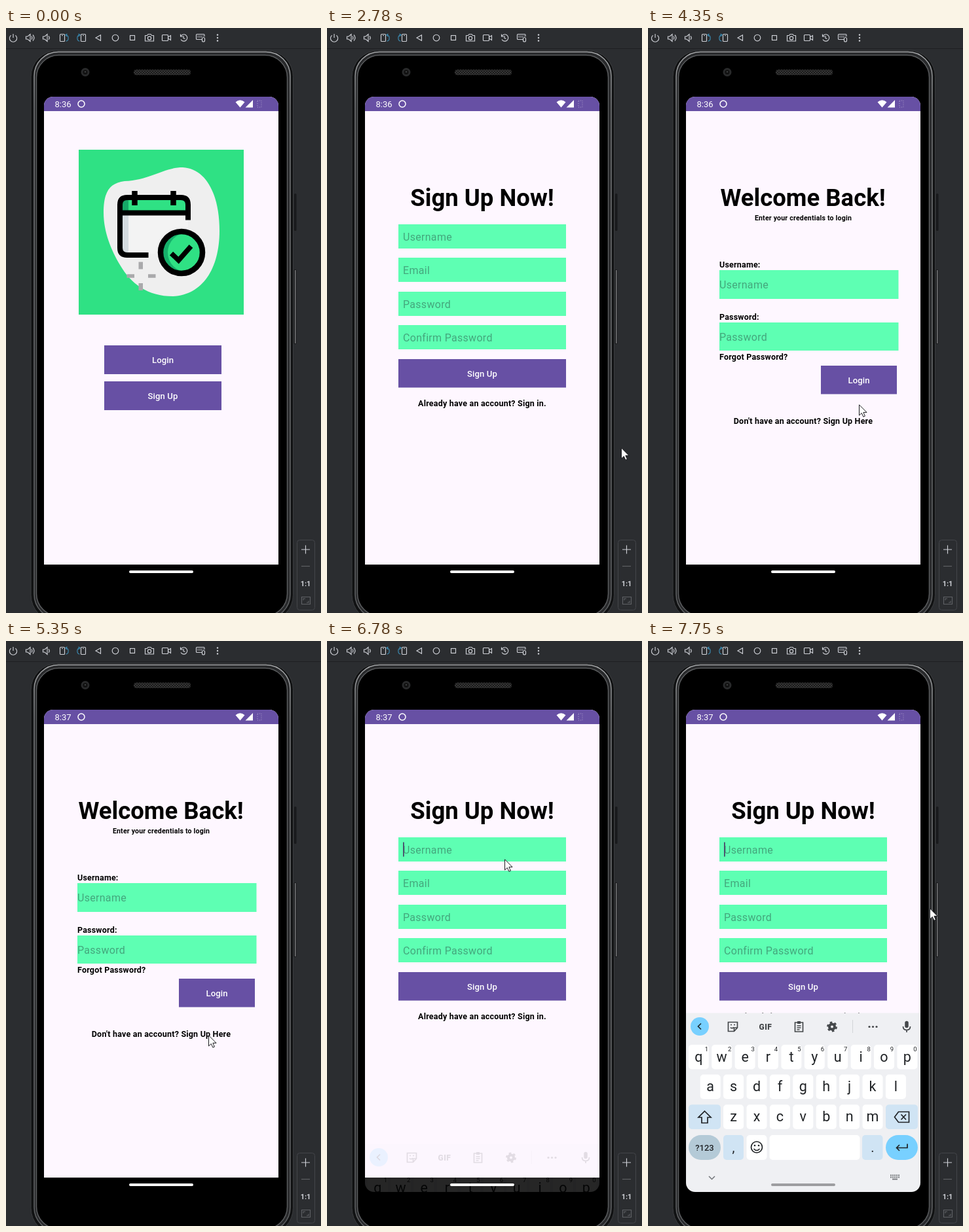
An HTML page for the animation above (8000 ms loop, 481 px wide and 894 px high).

```html
<!DOCTYPE html>
<html lang="en">
<head>
<meta charset="utf-8">
<title>Task app walkthrough</title>
<style>
html, body { margin: 0; width: 100%; height: 100%; overflow: hidden; background: #2b2d30; }
svg { display: block; width: 100vw; height: 100vh; font-family: Roboto, sans-serif; }
.loop { animation: 8s linear infinite; }
.mid { text-anchor: middle; }
.line { fill: none; stroke: #ced0d6; stroke-width: 1.15; }
.dim { stroke: #5f6165; }
.icon { fill: none; stroke: #45484b; stroke-width: 1.7; }
.button { fill: #6750a4; }
.label { fill: #fff; font-size: 13.1px; font-weight: 500; letter-spacing: .1px; text-anchor: middle; }
.title { font-size: 36.5px; font-weight: 700; text-anchor: middle; }
.bold { font-size: 12.5px; font-weight: 700; letter-spacing: .2px; }
.small { font-size: 10.55px; }
.field { fill: #5effb3; }
.hint { fill: #44a67c; font-size: 16px; letter-spacing: .3px; }

#home { animation-name: home; animation-timing-function: step-end; }
#signup { animation-name: signup; animation-timing-function: step-end; }
#login { animation-name: login; animation-timing-function: step-end; }
#before { animation-name: before; animation-timing-function: step-end; }
#after { animation-name: after; animation-timing-function: step-end; }
#caret { animation-name: caret; animation-timing-function: step-end; }
#handle { animation-name: handle; animation-timing-function: step-end; }
#keyboard { animation-name: rise; }
#pointer { animation-name: move; }
#arrow { animation-name: arrow; animation-timing-function: step-end; }

@keyframes home { 0% { visibility: visible } 19.75%, 100% { visibility: hidden } }
@keyframes signup {
  0%, 52.75% { visibility: hidden }
  19.75%, 71.125%, 100% { visibility: visible }
}
@keyframes login { 0%, 71.125%, 100% { visibility: hidden } 52.75% { visibility: visible } }
@keyframes before { 0% { visibility: visible } 56.25%, 100% { visibility: hidden } }
@keyframes after { 0% { visibility: hidden } 56.25%, 100% { visibility: visible } }
@keyframes caret {
  0%, 90.875% { visibility: hidden }
  83.125%, 96.875%, 100% { visibility: visible }
}
@keyframes handle { 0% { fill: #fff } 93.375% { fill: #c8c8ca } 96.875%, 100% { fill: #9d9da0 } }
@keyframes rise {
  0%, 84.74% { transform: translateY(274px); opacity: 0 }
  84.75% { transform: translateY(200px); opacity: .15 }
  85.6% { transform: translateY(200px); opacity: .15; animation-timing-function: cubic-bezier(.1, .6, .4, 1) }
  88.25%, 100% { transform: none; opacity: 1 }
}
@keyframes arrow {
  0%, 24.5% { visibility: hidden }
  2.5%, 34.75%, 100% { visibility: visible }
}
@keyframes move {
  0%, 2.5% { transform: translate(444px, 838px); animation-timing-function: cubic-bezier(.3, .2, .5, 1) }
  12.125% { transform: translate(297px, 549px) }
  13%, 19.75% { transform: translate(285px, 547px); animation-timing-function: ease-in }
  24% { transform: translate(481px, 672px) }
  34.74% { transform: translate(500px, 672px) }
  34.75%, 35.6% { transform: translate(449px, 641px); animation-timing-function: ease-in-out }
  40.5% { transform: translate(286px, 546px); animation-timing-function: ease-in-out }
  44.375%, 51.875% { transform: translate(327px, 571px) }
  52.75%, 55.1% { transform: translate(322px, 575px); animation-timing-function: ease-in-out }
  58.625%, 63.625% { transform: translate(309px, 602px) }
  65% { transform: translate(309px, 606px) }
  66.875%, 74.5% { transform: translate(309px, 602px); animation-timing-function: ease-in-out }
  80.625%, 85.6% { transform: translate(271px, 333px) }
  86.6% { transform: translate(280px, 372px) }
  87.8% { transform: translate(345px, 420px) }
  89.125%, 100% { transform: translate(430px, 408px) }
}
</style>
</head>
<body>
<svg viewBox="0 0 481 894" preserveAspectRatio="none">
  <defs>
    <clipPath id="screen"><rect x="58" y="105" width="358" height="737" rx="14"/></clipPath>
    <clipPath id="badge"><circle cx="268" cy="343" r="30"/></clipPath>
    <linearGradient id="rim" x1="0" x2="0" y1="0" y2="1">
      <stop offset="0" stop-color="#a3a5a7"/><stop offset=".1" stop-color="#77797b"/><stop offset="1" stop-color="#5d5f61"/>
    </linearGradient>
    <pattern id="mesh" width="4" height="4" patternUnits="userSpaceOnUse">
      <rect width="4" height="4" fill="#1b1b1b"/><path d="M0 0L4 4M4 0L0 4" stroke="#3c3c3c" stroke-width=".8"/>
    </pattern>
  </defs>

  <rect width="481" height="894" fill="#2b2d30"/>
  <rect y="31" width="481" height="1" fill="#1e1f22"/>

  <g class="line">
    <path d="M11 9V15M7.6 11.2A5.6 5.6 0 1 0 14.4 11.2"/>
    <path d="M30.500 13H33L37 9.500V20.500L33 17H30.500ZM39 12.500Q41 15 39 17.500M41 10.500Q45 15 41 19.500"/>
    <path d="M56.500 13H59L63 9.500V20.500L59 17H56.500ZM65 12.300Q67.500 15 65 17.700"/>
    <rect x="82.500" y="9.500" width="7" height="11" rx="1"/><path d="M85 11.500H87"/>
    <path d="M91 10.500Q96 11 95 17M93.500 9L91 10.500L93 13M91.500 20Q94.500 20 95 17" stroke="#3b8fb8"/>
    <rect x="114.500" y="9.500" width="7" height="11" rx="1"/><path d="M117 11.500H119"/>
    <path d="M113 10.500Q108 11 109 17M110.500 9L113 10.500L111 13M112.500 20Q109.500 20 109 17" stroke="#3b8fb8"/>
    <path d="M144.500 10.700V19.300L137 15Z"/>
    <circle cx="167" cy="15" r="4.800"/>
    <rect x="189.500" y="11.500" width="7" height="7"/>
    <path d="M212.500 11.500H215.500L217 9.500H221L222.500 11.500H225.500V20H212.500Z"/><circle cx="219" cy="15.500" r="2.600"/>
    <rect x="238.500" y="10.500" width="9" height="9" rx="1"/><path d="M247.500 14L251.500 11.500V18.500L247.500 16"/>
    <path d="M266.500 9.500V13H270M266.700 13A5.200 5.200 0 1 1 267 17.500M271 12V15.500L273.500 16.500"/>
    <path d="M299 17.500H291.500Q290.500 17.500 290.500 16.500V10.500Q290.500 9.500 291.500 9.500H302Q303 9.500 303 10.500V13"/>
    <path d="M292.500 12H301.500M292.500 14H299" stroke-dasharray="1.500 1"/><rect x="299.500" y="14.500" width="4" height="6.500" rx="2"/>
  </g>
  <g fill="#ced0d6"><circle cx="323" cy="10.500" r="1.200"/><circle cx="323" cy="15" r="1.200"/><circle cx="323" cy="19.500" r="1.200"/></g>

  <!-- phone body -->
  <rect x="440" y="253" width="3.500" height="57" rx="1.500" fill="#191a1c"/>
  <rect x="439.500" y="369" width="4" height="114" rx="1.500" fill="#1a1b1d"/>
  <rect x="441" y="370" width="1.500" height="112" fill="#77797b"/>
  <rect x="38" y="34.500" width="400.500" height="872" rx="40" fill="#111213" stroke="#3a3c3e"/>
  <rect x="43" y="36.500" width="391" height="866" rx="37" fill="#28292b" stroke="url(#rim)" stroke-width="1.500"/>
  <rect x="46.500" y="41.500" width="383" height="857" rx="34" fill="#000" stroke="#5a5c5e" stroke-width="1.500"/>
  <circle cx="121" cy="67.500" r="6.500" fill="#292a2b"/><circle cx="121" cy="67.500" r="3.600" fill="#111"/><circle cx="121" cy="67" r="1.300" fill="#3a3c3e"/>
  <rect x="195" y="63.500" width="87" height="8.500" rx="4" fill="url(#mesh)"/>

  <!-- screen -->
  <g clip-path="url(#screen)">
    <rect x="58" y="105" width="358" height="715" fill="#fef7ff"/>
    <rect x="58" y="105" width="358" height="22" fill="#6750a4"/>
    <g fill="#fff" font-size="13">
      <text class="loop" id="before" x="74.500" y="121">8:36</text>
      <text class="loop" id="after" x="74.500" y="121">8:37</text>
      <circle cx="115" cy="116" r="5" fill="none" stroke="#fff" stroke-width="1.500"/>
      <path d="M350.500 113.200Q357.500 107.300 364.500 113.200L357.500 121.500ZM377 110V121.500H365.500Z"/>
      <rect x="384" y="111" width="6" height="10" fill="none" stroke="#fff" stroke-opacity=".45" stroke-dasharray="1 2"/>
    </g>

    <g class="loop" id="home">
      <rect x="111" y="186" width="252" height="252" fill="#2fe184"/>
      <path d="M149 282C149 252 157 237 181 234C222 232 240 213 270 213C306 215 326 255 326 310C326 368 300 408 255 410C216 410 191 391 174 362C161 340 149 312 149 282Z" fill="#efefef"/>
      <rect x="174" y="283" width="104" height="62" fill="#f3f3f3"/>
      <rect x="178" y="286" width="9" height="57" fill="#d5dce0"/>
      <rect x="176" y="261" width="101" height="19" fill="#2fe184"/><rect x="177" y="262" width="10" height="17" fill="#16a868"/>
      <circle cx="268" cy="343" r="39" fill="#efefef"/>
      <path d="M217.500 347H185Q174 347 174 336V270Q174 259 185 259H267Q278 259 278 270V293.500M174 282.500H278" fill="none" stroke="#000" stroke-width="8"/>
      <path d="M196.500 249V271M255.500 249V271" stroke="#000" stroke-width="8.500"/>
      <circle cx="268" cy="343" r="32" fill="#16b06b"/>
      <circle cx="277" cy="343" r="30" fill="#2fe184" clip-path="url(#badge)"/>
      <circle cx="268" cy="343" r="32" fill="none" stroke="#000" stroke-width="8.500"/>
      <path d="M252.500 344.500L263.500 355L282.500 333.500" fill="none" stroke="#000" stroke-width="7.500"/>
      <path d="M202.500 357.500h6.500v11h-6.500zM202.500 390h6.500v11h-6.500zM184.500 376.300h11.500v5.500h-11.500zM217 376.300h11.500v5.500h-11.500z" fill="#a9a9ab"/>
      <rect class="button" x="150" y="485" width="179" height="44"/><text class="label" x="239.500" y="512">Login</text>
      <rect class="button" x="150" y="540" width="179" height="44"/><text class="label" x="239.500" y="567">Sign Up</text>
    </g>

    <g class="loop" id="signup">
      <text class="title" x="237" y="272">Sign Up Now!</text>
      <g id="fields"></g>
      <rect class="button" x="109" y="506" width="256" height="43.500"/><text class="label" x="237" y="533">Sign Up</text>
      <text class="bold mid" x="237" y="578">Already have an account? Sign in.</text>
    </g>

    <g class="loop" id="login">
      <text class="title" x="236.500" y="272">Welcome Back!</text>
      <text class="bold small mid" x="237" y="294">Enter your credentials to login</text>
      <text class="bold" x="109" y="366">Username:</text>
      <rect class="field" x="109" y="370" width="273.500" height="44"/><text class="hint" x="109" y="398">Username</text>
      <text class="bold" x="109" y="446">Password:</text>
      <rect class="field" x="109" y="450" width="273.500" height="43"/><text class="hint" x="109" y="478">Password</text>
      <text class="bold" x="109" y="507">Forgot Password?</text>
      <rect class="button" x="264" y="516" width="116" height="43.500"/><text class="label" x="322" y="543">Login</text>
      <text class="bold mid" x="237" y="605">Don't have an account? Sign Up Here</text>
    </g>

    <rect class="loop" id="caret" x="116" y="307.500" width="1.800" height="22" fill="#4b4a6c"/>

    <g class="loop" id="keyboard">
      <rect x="58" y="568.500" width="358" height="273.500" fill="#eff0f3"/>
      <circle cx="79" cy="589" r="14" fill="#78d0ff"/>
      <g class="icon">
        <path d="M81 584.500L76.500 589L81 593.500" stroke="#1d2a33"/>
        <path d="M122.500 582.500H136.500V591L131.500 596.500H122.500ZM136.500 591H131.500V596.500M126 590.500Q128 593 131 590.500"/>
        <path d="M126 586.500H128M131 586.500H133"/>
        <path d="M224.500 583H236.500V597H224.500ZM227.500 588H233.500M227.500 591H233.500M227.500 594H231.500"/>
        <path d="M228 583H233" stroke-width="4"/>
        <circle cx="281" cy="589.500" r="4" stroke-width="4"/><circle cx="281" cy="589.500" r="6.700" stroke-width="2.500" stroke-dasharray="3.500 3.516"/>
        <path d="M312.500 579V599" stroke="#d3d5d8" stroke-width="1"/>
        <path d="M389.500 589Q389.500 594.500 395 594.500T400.500 589M395 594.500V598"/>
        <path d="M395 583.500V588.500" stroke-width="5.500" stroke-linecap="round"/>
      </g>
      <text class="mid" x="179.500" y="593.500" font-size="12" font-weight="800" fill="#45484b" letter-spacing=".5">GIF</text>
      <g fill="#45484b"><circle cx="338" cy="589.500" r="1.600"/><circle cx="343.500" cy="589.500" r="1.600"/><circle cx="349" cy="589.500" r="1.600"/></g>
      <g id="keys"></g>
      <g class="icon" style="stroke:#202326">
        <path d="M86.500 718.500L96 728H91V736.500H82V728H77Z"/>
        <path d="M382.500 719.500H398.500V735.500H382.500L376.500 727.500ZM386.500 723.500L394 731.500M394 723.500L386.500 731.500"/>
        <circle cx="166" cy="773.500" r="8.500"/><path d="M161.500 776Q166 781 170.500 776"/>
        <path d="M396 768.500V774.500H379.500M384 770L379.500 774.500L384 779"/>
      </g>
      <g fill="#202326"><circle cx="163" cy="771" r="1.300"/><circle cx="169" cy="771" r="1.300"/></g>
      <path d="M93 818L97.500 822.500L102 818" fill="none" stroke="#73767a" stroke-width="1.500"/>
      <path d="M370 816.500H384M370 819.500H384" stroke="#73767a" stroke-width="1.800" stroke-dasharray="2 1"/><path d="M373 822.500H381" stroke="#73767a" stroke-width="1.800"/>
    </g>
  </g>
  <rect class="loop" id="handle" x="188" y="829" width="98" height="4" rx="2"/>

  <!-- zoom panel -->
  <rect x="444.500" y="782.500" width="27" height="107" rx="4" fill="#2b2d30" stroke="#43454a"/>
  <path class="line" d="M457.500 790.500V803.500M451 797H464"/>
  <path class="line dim" d="M451 822.500H464"/>
  <text class="mid" x="457.500" y="853" font-size="11" font-weight="700" fill="#ced0d6">1:1</text>
  <path class="line dim" d="M451.500 869.500H464.500V880.500H451.500ZM454 874.500V872H457M462 875.500V878H459"/>

  <g class="loop" id="pointer">
    <path class="loop" id="arrow" d="M.5 .8V17L4.300 13.500L6.900 19.200L9.400 18.100L6.900 12.400H12Z" fill="#fff" stroke="#1b1b1f" stroke-width="1"/>
  </g>
</svg>
<script>
const byId = id => document.getElementById(id);
const rect = (x, y, w, h, r, fill) =>
  `<rect x="${x}" y="${y}" width="${w}" height="${h}" rx="${r}" fill="${fill}"/>`;
const text = (s, x, y, size, weight = 400) =>
  `<text class="mid" x="${x}" y="${y}" font-size="${size}" font-weight="${weight}" fill="#202326">${s}</text>`;

byId('fields').innerHTML = ['Username', 'Email', 'Password', 'Confirm Password'].map((name, i) => {
  const y = Math.round(300 + i * 51.4);
  return `<rect class="field" x="109" y="${y}" width="256" height="37"/>` +
    `<text class="hint" x="116" y="${y + 25}">${name}</text>`;
}).join('');

const pitch = 35.4, pale = '#d0e4f4', blue = '#78d0ff';
let keys = '';
[['qwertyuiop', 77.3, 617], ['asdfghjkl', 95.2, 662.5], ['zxcvbnm', 130.6, 708.5]].forEach(([row, start, y], r) => {
  [...row].forEach((ch, i) => {
    const x = start + i * pitch;
    keys += rect(x - 15.5, y, 31, 37.5, 5, '#fff') + text(ch, x, y + 25.5, 21.5);
    if (r === 0) keys += text((i + 1) % 10, x + 12, y + 10, 9.5);
  });
});
keys += rect(62, 708.5, 49, 37.5, 5, pale) + rect(363, 708.5, 49, 37.5, 5, pale)
  + rect(62, 755, 49, 38, 19, '#b4cad7') + text('?123', 86.5, 779, 13, 500)
  + rect(115, 755, 31, 38, 5, pale) + text(',', 130.5, 781, 20)
  + rect(150.5, 755, 31, 38, 5, '#fff')
  + rect(185.5, 755, 138, 38, 5, '#fff')
  + rect(327, 755, 31.5, 38, 5, pale) + text('.', 343, 781, 20)
  + rect(363, 755, 49, 38, 19, blue);
byId('keys').innerHTML = keys;
</script>
</body>
</html>
```
